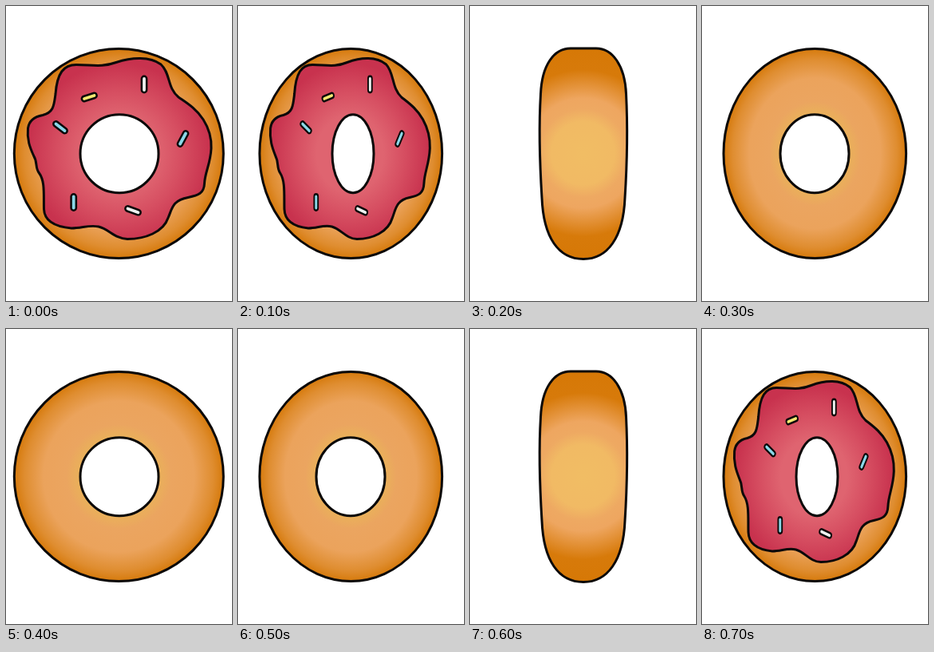
Animation of 283 by 369 pixels, one loop 0.8 s. Source, as an HTML page:

```html
<!DOCTYPE html>
<html lang="en">
<head>
<meta charset="utf-8">
<title>Spinning donut</title>
<style>
  html, body { margin: 0; width: 100%; height: 100%; overflow: hidden; background: #fff; }
  svg { display: block; width: 100%; height: 100%; }
  .line { stroke: #0b0909; stroke-width: 3; stroke-linejoin: round; vector-effect: non-scaling-stroke; }
</style>
</head>
<body>
<svg viewBox="0 0 283 369">
  <defs>
    <radialGradient id="dough">
      <stop offset=".34" stop-color="#e9b458"/>
      <stop offset=".5" stop-color="#eba560"/>
      <stop offset=".72" stop-color="#eba35c"/>
      <stop offset=".9" stop-color="#df8d30"/>
      <stop offset="1" stop-color="#d67a0c"/>
    </radialGradient>
    <radialGradient id="rim" gradientUnits="userSpaceOnUse" cx="141.5" cy="184" r="132">
      <stop offset="0" stop-color="#f1bd64"/>
      <stop offset=".3" stop-color="#f1ba64"/>
      <stop offset=".42" stop-color="#eea962"/>
      <stop offset=".52" stop-color="#eea660"/>
      <stop offset=".79" stop-color="#d77a0a"/>
      <stop offset="1" stop-color="#d67806"/>
    </radialGradient>
    <radialGradient id="icing" gradientUnits="userSpaceOnUse" cx="142" cy="185" r="120">
      <stop offset=".4" stop-color="#df6470"/>
      <stop offset=".65" stop-color="#d64e61"/>
      <stop offset=".95" stop-color="#c8324e"/>
    </radialGradient>
  </defs>
  <g id="ring">
    <ellipse id="body" class="line" cx="141.3" cy="184.5" ry="131" fill="url(#dough)"/>
    <g id="top">
      <path id="glaze" class="line" fill="url(#icing)" d="M62 110
        C64 84 72 73.5 88 73.5 C108 73.5 120 77 138 70.5
        C158 64 180 63 194 73 C206 84 202 103 216 114
        C226 121 238 128 247 142 C254 153 257.5 166 257 178
        C256 198 249 208 248.5 222 C248 234 241 237 228 239.5
        C208 243 208 254 203 265 C197 283 174 291.5 152 291.5
        C136 291 129 279 116 276 C104 273.5 95 278 82 278
        C60 276 48 268 47.5 254 C47 236 49 219 41.5 209
        C36 202 40 196 34.5 187 C30 177 26 167 27.5 153
        C29 142 38 138 46 136.5 C60 133 60 124 62 110Z"/>
      <g id="sprinkles"></g>
    </g>
    <ellipse id="hole" class="line" cy="184.7" ry="49" fill="#fff"/>
  </g>
  <path id="side" class="line" fill="url(#rim)" d="M126 53 H158
    C178 53 194 74 195.5 110 C198 160 196.5 200 194 240
    C192 290 172 316.5 142 316.5 C111 316.5 92 290 90 240
    C87.5 200 85.5 160 88.5 110 C90 74 105 53 126 53Z"/>
</svg>
<script>
const el = id => document.getElementById(id);
const set = (id, attrs) => Object.entries(attrs).forEach(([k, v]) => el(id).setAttribute(k, v));
const show = (id, on) => el(id).style.display = on ? "" : "none";

const white = "#eef2f0", blue = "#8ad8e8", yellow = "#f5ea72";
const sprinkles = [
  [173, 91, 173, 105, white], [98, 116, 110.5, 112, yellow],
  [62.5, 147.5, 73.5, 156, blue], [225, 159.5, 218, 172.5, blue],
  [84.7, 238.5, 84.7, 252.5, blue], [152.5, 253.5, 165.5, 258.2, white]
];
el("sprinkles").innerHTML = sprinkles.map(([x1, y1, x2, y2, color]) =>
  [["#0b0909", 8.8], [color, 3.8]].map(([stroke, width]) =>
    `<path d="M${x1} ${y1}L${x2} ${y2}" stroke="${stroke}" stroke-width="${width}" stroke-linecap="round"/>`
  ).join("")).join("");

const STEP = 100, STEPS = 8;
const poses = {
  front: { rx: 131, hole: [142, 49], glaze: [1, 0], dots: [1, 0] },
  frontTurn: { rx: 114.3, hole: [144, 26], glaze: [0.87, 16.7], dots: [0.765, 33] },
  side: null,
  backTurn: { rx: 114.3, hole: [141, 43] },
  back: { rx: 131, hole: [142, 49] }
};
const order = Object.values(poses);
const squeeze = ([scale, shift]) => `matrix(${scale} 0 0 1 ${shift} 0)`;

function draw(time) {
  const step = Math.floor(time / STEP) % STEPS;
  // The turn runs out to the back and returns through the same poses.
  const pose = order[Math.min(step, STEPS - step)];
  show("ring", pose);
  show("side", !pose);
  if (!pose) return;
  set("body", { rx: pose.rx });
  set("hole", { cx: pose.hole[0], rx: pose.hole[1] });
  show("top", pose.glaze);
  if (pose.glaze) {
    set("glaze", { transform: squeeze(pose.glaze) });
    set("sprinkles", { transform: squeeze(pose.dots) });
  }
}

const start = performance.now();
function tick() {
  draw(performance.now() - start);
  requestAnimationFrame(tick);
}
tick();
</script>
</body>
</html>
```
